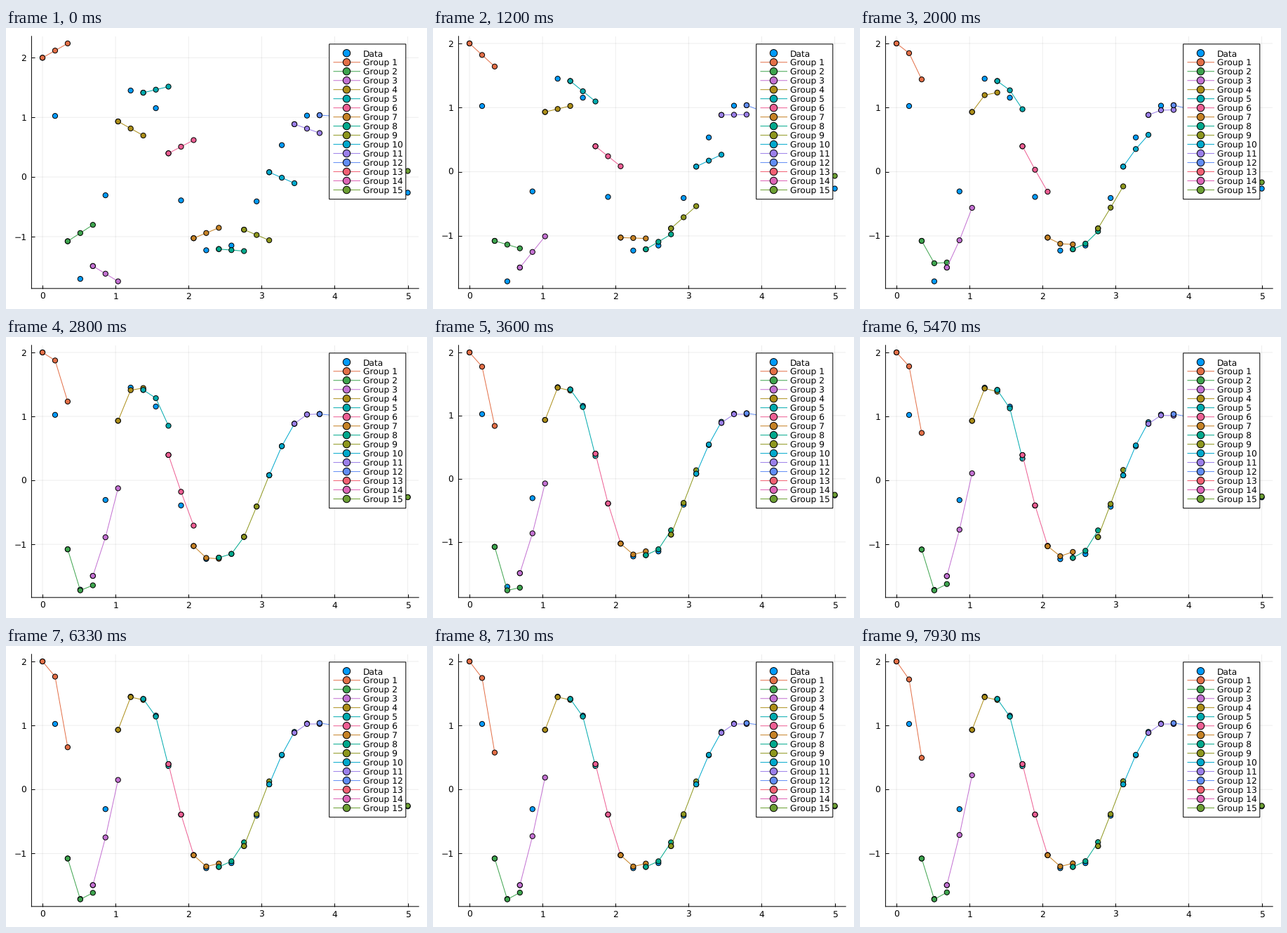
These frames come from a looping animation (600x400 px, 8000 ms). A matplotlib script:

```python
import numpy as np
import matplotlib.pyplot as plt
from matplotlib.animation import FuncAnimation
from matplotlib.patches import Rectangle

W, H, DPI = 600, 400, 100
LOOP, FRAMES = 8000, 120
PX = 72 / DPI
FONT = 8.8

plt.rcParams["font.family"] = "DejaVu Sans"
plt.rcParams["text.hinting"] = "none"

BLUE = "#009AFA"
COLORS = ["#E36F47", "#3EA44E", "#C371D2", "#AC8E18", "#00AAAE",
          "#ED5E93", "#C68225", "#00A98D", "#8E971E", "#00A9CC",
          "#9B7FE9", "#618DF6", "#F16073", "#DD65B6", "#6C9F33"]


def cubic_spiral(u):
    a, b = u ** 3
    return np.array([-.1 * a - 2 * b, 2 * a - .1 * b])


def solve(u, t):
    """Classic Runge-Kutta over evenly spaced times."""
    h, out = t[1] - t[0], [u]
    for _ in t[1:]:
        k1 = cubic_spiral(u)
        k2 = cubic_spiral(u + h / 2 * k1)
        k3 = cubic_spiral(u + h / 2 * k2)
        k4 = cubic_spiral(u + h * k3)
        u = u + h / 6 * (k1 + 2 * k2 + 2 * k3 + k4)
        out.append(u)
    return np.array(out)


FINE = np.linspace(0, 5, 2901)
PATH = solve(np.array([2.0, 0.0]), FINE)
X, DATA = FINE[::100], PATH[::100, 0]

# Training schedule, one value per frame
now = np.arange(FRAMES) * LOOP / FRAMES
turn = np.clip(now / 1200, 0, 1)               # untrained slope to linear fit
fit = np.clip((now - 1200) / 1600, 0, 1)       # linear fit to the curved path
short_lag = np.interp(now, [2800, 3600], [.28, 0])
long_lag = np.interp(now, [2800, 3600, 7930], [.55, .48, .38])
drift = np.interp(now, [2800, 3600, 4600, 6330, 7930], [0, .02, .045, .016, .018])
dip = -.05 * np.exp(-((now - 3550) / 450) ** 2)


def predict(n):
    """Points of group n in every frame: its x values and frames by points."""
    first = 2 * (n - 1)
    x = X[first:first + 3]
    u1, u2 = PATH[100 * first]
    step = np.arange(len(x))
    if n <= 3:
        lag, bias = long_lag * (1, .3, .78)[n - 1], dip
    else:
        lag, bias = short_lag * (n < 8), drift * (.5 - u1)
    slope = ((1 - turn) * (.083 * u2 + .12 * (u1 / 2) ** 5)
             - turn * .09 * (u1 + u2))
    straight = u1 + np.outer(slope, step)
    curved = np.interp(x[0] + np.outer(1 - lag, x - x[0]), FINE, PATH[:, 0])
    w = fit[:, None]
    return x, (1 - w) * straight + w * curved + np.outer(bias, step)


groups = [predict(n) for n in range(1, 16)]
ALL = np.hstack([ys for _, ys in groups] + [np.tile(DATA, (FRAMES, 1))])
LOW, HIGH = ALL.min(axis=1), ALL.max(axis=1)

fig = plt.figure(figsize=(W / DPI, H / DPI), dpi=DPI, facecolor="white")


def dots(ax, x, y, colors, size, z):
    return ax.scatter(x, y, s=(size * PX) ** 2, facecolors=colors,
                      edgecolors="black", linewidths=PX, zorder=z, clip_on=False)


# Plot area
L, R, T, B = 36.4, 588.2, 11.8, 370.8
ax = fig.add_axes([L / W, 1 - B / H, (R - L) / W, (B - T) / H])
ax.set_xlim(-.15, 5.15)
ax.set_xticks(range(6))
ax.set_yticks([-1, 0, 1, 2], ["\u22121", "0", "1", "2"])
ax.set_axisbelow(True)
ax.grid(color="black", alpha=.07, linewidth=PX, snap=False)
ax.tick_params(direction="in", length=5 * PX, width=PX, labelsize=FONT)
ax.tick_params(axis="x", pad=6.2 * PX)
ax.tick_params(axis="y", pad=7 * PX)
for side, spine in ax.spines.items():
    spine.set(linewidth=PX, snap=False, visible=side in ("left", "bottom"))

dots(ax, X, DATA, [BLUE] * len(X), 7.2, 3)
artists = []
for i, ((x, ys), color) in enumerate(zip(groups, COLORS)):
    line, = ax.plot(x, ys[0], color=color, linewidth=PX, zorder=4 + i)
    artists.append((line, dots(ax, x, ys[0], [color] * len(x), 7.2, 4.5 + i)))

# Legend, in pixels
top = fig.add_axes([0, 0, 1, 1], zorder=5)
top.set(xlim=(0, W), ylim=(H, 0))
top.axis("off")
top.add_patch(Rectangle((460.7, 22.9), 109.1, 220.8, facecolor="white",
                        edgecolor="black", linewidth=PX, snap=False))
rows = 35.8 + 12.98 * np.arange(16)
for i, y in enumerate(rows):
    if i:
        top.plot([467, 504.5], [y, y], color=COLORS[i - 1], linewidth=PX,
                 snap=False, zorder=2)
    top.text(509, y + 5.2, f"Group {i}" if i else "Data", fontsize=FONT)
dots(top, np.full(16, 485.5), rows, [BLUE] + COLORS, 10.4, 3)


def update(frame):
    low, high = LOW[frame], HIGH[frame]
    margin = .03 * (high - low)
    ax.set_ylim(low - margin, high + margin)
    for (x, ys), (line, marks) in zip(groups, artists):
        line.set_ydata(ys[frame])
        marks.set_offsets(np.column_stack([x, ys[frame]]))
    return []


anim = FuncAnimation(fig, update, frames=FRAMES, interval=LOOP / FRAMES,
                     repeat=True, repeat_delay=0, blit=False)
plt.show()
```
